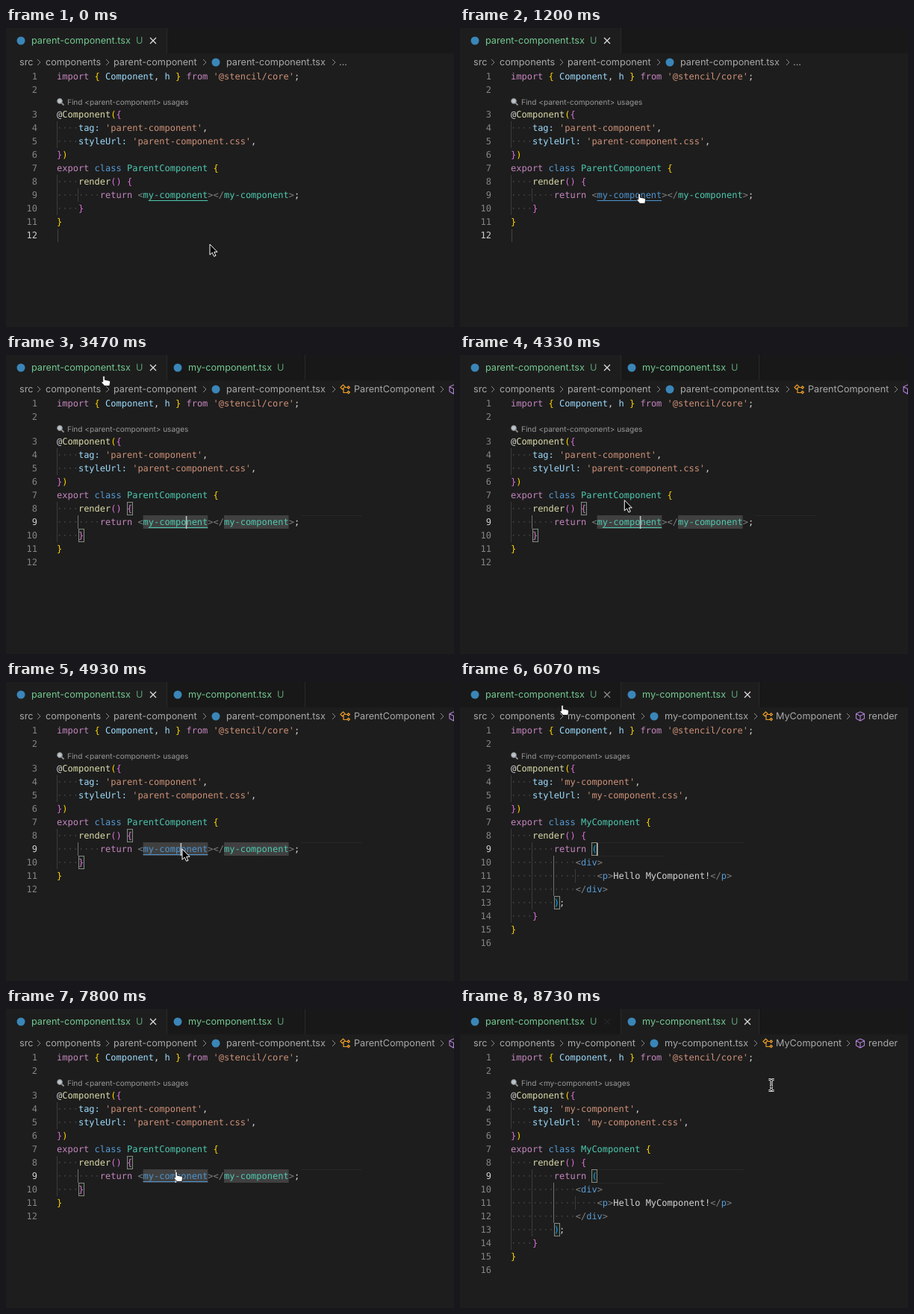
Recreate the animation shown at these times as an HTML page. Size 600 px wide and 401 px high, loop 8.8 s.

```html
<!DOCTYPE html>
<html lang="en">
<head>
<meta charset="utf-8">
<title>Go to definition</title>
<style>
  html, body { margin: 0; width: 100%; height: 100%; overflow: hidden; background: #1d1d1d; }
  svg { display: block; }
  text { white-space: pre; text-rendering: geometricPrecision; }
  .code { font: 12px "DejaVu Sans Mono", monospace; }
  .ui { font: 12.65px Inter, sans-serif; }
  .lens { font: 10.05px Inter, sans-serif; }
</style>
</head>
<body>
<svg id="stage" width="600" height="401" viewBox="0 0 600 401"></svg>
<script>
const LOOP = 8800, LEFT = 68, CHAR = 7.224;
const COLORS = {
  k: '#c586c0', b: '#569cd6', t: '#4ec9b0', s: '#ce9178', v: '#9cdcfe', f: '#dcdcaa',
  y: '#ffd700', p: '#da70d6', u: '#179fff', w: '#d4d4d4', g: '#808080', d: '#444444'
};
const GREEN = '#73c991', CRUMB = '#a9a9a9', LINK = '#4e94ce';
const stage = document.getElementById('stage');

function add(parent, tag, attrs = {}, content) {
  const el = document.createElementNS('http://www.w3.org/2000/svg', tag);
  for (const k in attrs) el.setAttribute(k, attrs[k]);
  if (content !== undefined) el.textContent = content;
  return parent.appendChild(el);
}
const group = parent => add(parent, 'g');
const rect = (p, x, y, width, height, fill) => add(p, 'rect', { x, y, width, height, fill });
const line = (p, d, stroke, width = 1) =>
  add(p, 'path', { d, stroke, fill: 'none', 'stroke-width': width });
const label = (p, x, y, s, fill, cls = 'ui') => add(p, 'text', { x, y, fill, class: cls }, s);
const dot = (p, x, y) => add(p, 'circle', { cx: x, cy: y, r: 5.5, fill: '#3a86b8' });
const show = (el, on) => el.setAttribute('visibility', on ? 'inherit' : 'hidden');

const baseline = n => n < 3 ? 51 + n * 18 : 66 + n * 18;
const rowTop = n => baseline(n) - 13;
const col = c => LEFT + c * CHAR;

// "~" starts a token; the next letter picks its colour
function code(p, n, src) {
  const t = add(p, 'text', { x: LEFT, y: baseline(n), class: 'code' });
  return src.split('~').slice(1).map(s => add(t, 'tspan', { fill: COLORS[s[0]] }, s.slice(1)));
}
function lineNumber(p, n, active) {
  label(p, 42, baseline(n), n, active ? '#d0d0d0' : '#858585', 'code').setAttribute('text-anchor', 'end');
}
function bracket(p, n, c) {
  add(p, 'rect', {
    x: Math.round(col(c)) + .5, y: rowTop(n) + .5, width: 7, height: 17,
    fill: '#1c261c', stroke: '#888888'
  });
}
function guide(p, level, from, to, color = '#3c3c3c') {
  const x = Math.floor(col(level * 4)) + .5;
  line(p, `M${x} ${rowTop(from)}V${rowTop(to) + 18}`, color);
}
function chevrons(p, ...xs) {
  xs.forEach(x => line(p, `M${x - 2} 42l4 4l-4 4`, '#8a8a8a'));
}
function classIcon(p, x) {
  line(p, `M${x - 6} 43.5l3.5-3.5l2.5 2.5l-3.5 3.5zM${x} 43.5h3M${x - 2} 45v5.5h5`, '#ee9d28', 1.2);
  line(p, `M${x + 3} 43.5l1.7-1.7l1.7 1.7l-1.7 1.7zM${x + 3} 50l1.7-1.7l1.7 1.7l-1.7 1.7z`, '#ee9d28', 1.2);
}
function cubeIcon(p, x) {
  line(p, `M${x} 40l5.5 2.6v6.4l-5.5 3l-5.5-3v-6.4zM${x - 5.5} 42.8l5.5 2.7l5.5-2.7M${x} 45.5v6`, '#b180d7', 1.1);
}
const close = (p, x, color) =>
  line(p, `M${x - 4} 13l8 8m0-8l-8 8`, color, 1.2);

function header(p, tag, fileX) {
  label(p, 18, 50, 'src', CRUMB);
  label(p, 53, 50, 'components', CRUMB);
  label(p, 144, 50, tag, CRUMB);
  label(p, fileX, 50, tag + '.tsx', CRUMB);
  dot(p, fileX - 14, 46);
  chevrons(p, 44, 136, fileX - 29);
  line(p, 'M74.5 100.5l3 3', '#8c8c8c', 1.8);
  add(p, 'circle', { cx: 72, cy: 98, r: 3.4, fill: '#b9c3c9', stroke: '#858585' });
  label(p, 82, 103, `Find <${tag}> usages`, '#999999', 'lens');
}
function opening(p, tag, name) {
  code(p, 1, "~kimport ~y{~v Component~w, ~vh ~y}~k from ~s'@stencil/core'~w;");
  code(p, 3, '~w@~fComponent~y(~p{');
  code(p, 4, `~d····~vtag: ~s'${tag}'~w,`);
  code(p, 5, `~d····~vstyleUrl: ~s'${tag}.css'~w,`);
  code(p, 6, '~p}~y)');
  code(p, 7, `~kexport ~bclass ~t${name} ~y{`);
  code(p, 8, '~d····~frender~p() {');
}

// tab strip
rect(stage, 0, 0, 600, 401, '#1d1d1d');
rect(stage, 0, 0, 600, 34, '#181818');
const tabBg = rect(stage, 0, 0, 215, 34, '#1d1d1d');
line(stage, 'M215.5 0V34', '#292929');
dot(stage, 20, 17);
label(stage, 34, 21, 'parent-component.tsx', GREEN);
label(stage, 174, 21, 'U', '#5a9e72');
const close1 = close(stage, 197, '#e0e0e0');
const tab2 = group(stage);
const tab2Bg = rect(tab2, 216, 0, 184, 34, '#1d1d1d');
line(tab2, 'M400.5 0V34', '#292929');
dot(tab2, 230, 17);
label(tab2, 244, 21, 'my-component.tsx', GREEN);
label(tab2, 363, 21, 'U', '#5a9e72');
const close2 = close(tab2, 385, '#e0e0e0');

// parent-component.tsx
const parent = group(stage), idle = group(parent), focus = group(parent);
header(parent, 'parent-component', 295);
chevrons(parent, 439);
label(idle, 446, 50, '...', CRUMB);
rect(idle, 69, rowTop(12) + 1, 1, 17, '#444444');
classIcon(focus, 454);
label(focus, 466, 50, 'ParentComponent', CRUMB);
chevrons(focus, 584);
cubeIcon(focus, 599.5);
rect(focus, col(16), 215, CHAR * 12, 18, '#404040');
rect(focus, col(31), 215, CHAR * 12, 18, '#404040');
line(focus, 'M395 215.5H477', '#272727');
bracket(focus, 8, 13);
bracket(focus, 10, 4);
for (let n = 1; n <= 12; n++) {
  if (n !== 9 && n !== 12) lineNumber(parent, n);
}
lineNumber(idle, 9);
lineNumber(idle, 12, true);
lineNumber(focus, 9, true);
lineNumber(focus, 12);
guide(parent, 0, 4, 5);
guide(parent, 0, 8, 10);
guide(idle, 1, 9, 9);
guide(focus, 1, 9, 9, '#707070');
opening(parent, 'parent-component', 'ParentComponent');
const link = code(parent, 9, '~d········~kreturn ~g<~tmy-component~g></~tmy-component~g>~w;')[3];
code(parent, 10, '~d····~p}');
code(parent, 11, '~y}');
const underline = line(parent, '', COLORS.t);

// my-component.tsx
const child = group(stage);
header(child, 'my-component', 274);
chevrons(child, 396, 520);
classIcon(child, 412);
label(child, 423, 50, 'MyComponent', CRUMB);
cubeIcon(child, 536);
label(child, 547, 50, 'render', CRUMB);
line(child, 'M184 215.5H380M184 233.5H272', '#272727');
bracket(child, 9, 15);
bracket(child, 13, 8);
for (let n = 1; n <= 16; n++) lineNumber(child, n, n === 9);
guide(child, 0, 4, 5);
guide(child, 0, 8, 14);
guide(child, 1, 9, 13);
guide(child, 2, 10, 12, '#707070');
guide(child, 3, 11, 11);
opening(child, 'my-component', 'MyComponent');
code(child, 9, '~d········~kreturn ~u(');
code(child, 10, '~d············~g<~bdiv~g>');
code(child, 11, '~d················~g<~bp~g>~wHello MyComponent!~g</~bp~g>');
code(child, 12, '~d············~g</~bdiv~g>');
code(child, 13, '~d········~u)~w;');
code(child, 14, '~d····~p}');
code(child, 15, '~y}');

const caret = rect(stage, 0, 216, 1.6, 17, '#c4c4c4');

// mouse pointers, hot spot at 0,0
const mouse = group(stage);
const pointers = { arrow: group(mouse), hand: group(mouse), beam: group(mouse) };
add(pointers.arrow, 'path', {
  d: 'M0 0V14.2L3.3 11.2L5.6 16.3L8 15.3L5.7 10.3H10Z', fill: '#000', stroke: '#fff'
});
add(pointers.hand, 'path', {
  d: 'M-1.3 1.2C-1.3-.4 1.3-.4 1.3 1.2V5.2L6.5 6.2C8.3 6.6 8.8 7.6 8.5 9.2L7.7 13.5H1L-2.8 9.4C-3.6 8.2-2.4 7.2-1.3 8Z',
  fill: '#fff', stroke: '#111', 'stroke-width': .9
});
const beam = 'M-3.5-7.5Q0-7.5 0-5.5Q0-7.5 3.5-7.5M0-5.5V5.5M-3.5 7.5Q0 7.5 0 5.5Q0 7.5 3.5 7.5M-2 2H2';
line(pointers.beam, beam, '#fff', 3);
line(pointers.beam, beam, '#000', 1);

// time, view, caret column (none while idle)
const SCENES = [
  [0, 'parent'], [1430, 'parent', 24], [1500, 'child', 16], [3270, 'parent', 24],
  [4800, 'parent', 23], [5000, 'child', 16], [6330, 'parent', 23], [7730, 'parent', 22],
  [7830, 'child', 16]
];
const SHAPES = [
  [0, 'arrow'], [1000, 'hand'], [1500, 'beam'], [3050, 'hand'], [3950, 'arrow'],
  [5000, 'beam'], [5960, 'hand'], [6900, 'arrow'], [7130, 'hand'], [7830, 'beam']
];
const LINKED = [[1000, 1500], [4600, 5000], [7130, 7830]];
const PATH = [
  [0, 273, 290], [130, 273, 290], [1000, 240, 222], [1500, 240, 222], [1560, 241, 226],
  [2270, 241, 226], [3130, 131, 28], [3870, 131, 28], [4480, 236, 224], [5000, 236, 224],
  [5060, 236, 225], [5440, 236, 225], [5730, 167, 60], [5840, 167, 60], [6050, 137, 31],
  [6500, 137, 31], [6760, 138, 35], [7220, 228, 218], [7830, 228, 218], [7900, 230, 227],
  [8300, 230, 227], [8720, 417, 102], [LOOP, 417, 102]
];
const at = (table, t) => table.findLast(row => row[0] <= t);

function position(t) {
  const i = PATH.findIndex(k => k[0] > t), a = PATH[i - 1], b = PATH[i];
  const u = (t - a[0]) / (b[0] - a[0]), e = u * u * (3 - 2 * u);
  return [a[1] + (b[1] - a[1]) * e, a[2] + (b[2] - a[2]) * e];
}

function draw(t) {
  const [start, view, column] = at(SCENES, t);
  const inParent = view === 'parent', focused = column !== undefined;
  const [x, y] = position(t);

  show(parent, inParent);
  show(child, !inParent);
  show(idle, !focused);
  show(focus, focused);
  show(tab2, t >= 1500);
  tabBg.setAttribute('fill', inParent ? '#1d1d1d' : '#181818');
  tab2Bg.setAttribute('fill', inParent ? '#181818' : '#1d1d1d');
  const hover = y < 34 && x < 215;
  close1.setAttribute('stroke', inParent ? '#e0e0e0' : hover ? '#8c8c8c' : '#252525');
  show(close2, !inParent);

  const linked = LINKED.some(([a, b]) => t >= a && t < b);
  link.setAttribute('fill', linked ? LINK : COLORS.t);
  underline.setAttribute('stroke', linked ? LINK : COLORS.t);
  underline.setAttribute('d', `M${col(linked ? 16 : 17)} 231.5H${col(28)}`);

  show(caret, focused && (t - start) % 1000 < 500);
  if (focused) caret.setAttribute('x', col(column) - .6);

  const shape = at(SHAPES, t)[1];
  for (const k in pointers) show(pointers[k], k === shape);
  mouse.setAttribute('transform', `translate(${x.toFixed(2)} ${y.toFixed(2)})`);
}

function tick() {
  draw(performance.now() % LOOP);
  requestAnimationFrame(tick);
}
tick();
</script>
</body>
</html>
```
